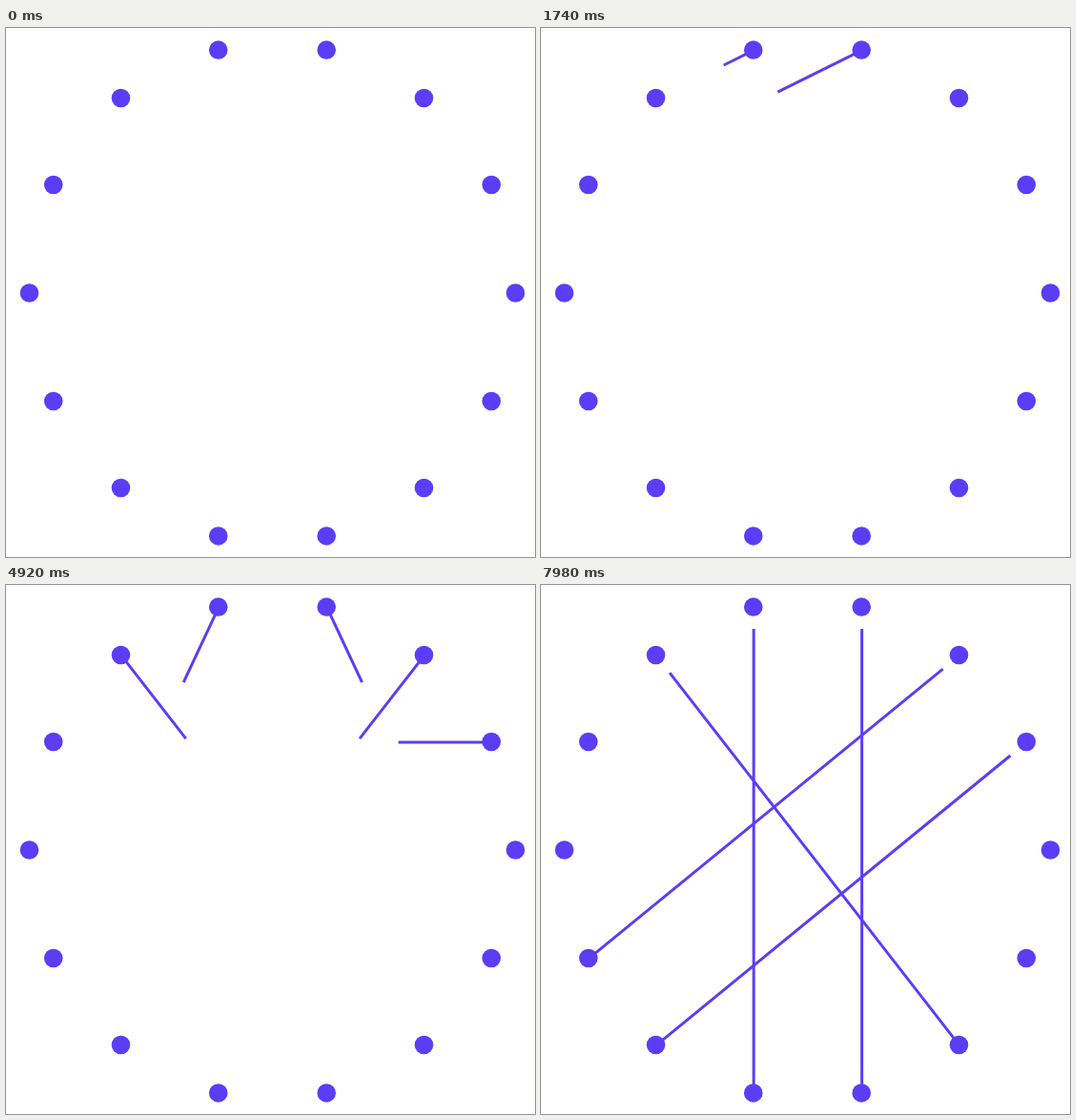
Animation of 555x555 px, one loop 8 s. Source, as an HTML page with a canvas:

```html
<!DOCTYPE html>
<html lang="en">
<head>
<meta charset="utf-8">
<title>Ring of dots</title>
<style>
  html, body { margin: 0; width: 100%; height: 100%; overflow: hidden; background: #fff; }
  canvas { display: block; }
</style>
</head>
<body>
<canvas id="stage" width="555" height="555"></canvas>
<script>
const ctx = document.getElementById('stage').getContext('2d');
const LOOP = 8000;
const HOLD = 1122; // time a finished pattern rests before the next change
const COLOR = '#5b3df5';

// Dots run clockwise from the rightmost one.
const dots = Array.from({ length: 14 }, (_, i) => {
  const a = i * Math.PI / 7;
  return [279.5 + 255 * Math.cos(a), 278 + 261.5 * Math.sin(a)];
});

// Links leave consecutive dots, counted from `first`, towards the dots in `ends`.
const patterns = [
  { first: 6, ends: [0, 1, 2, 3, 4, 5] },
  { first: 10, ends: [9, 8] },
  { first: 9, ends: [2, 6, 1, 5, 8], reverse: true },
  { first: 6, ends: [4, 5, 1, 2, 12, 13] },
  { first: 9, ends: [2, 4, 3, 6, 5] }
];

// A change wipes the old pattern in its first half and grows the new one in its second.
const starts = [-270, 1372, 3045, 4727, 6371, 7969];
const changes = starts.map((from, i) => ({ from, to: (starts[i + 1] ?? from + 1650) - HOLD }));

const clamp = p => Math.min(1, Math.max(0, p));
const mix = (a, b, p) => a.map((v, i) => v + (b[i] - v) * p);
const phase = (t, { from, to }) => (t - from) / (to - from);

function drawLink(a, b, tail, head) {
  ctx.beginPath();
  ctx.moveTo(...mix(a, b, tail));
  ctx.lineTo(...mix(a, b, head));
  ctx.stroke();
}

function render(t) {
  ctx.fillStyle = '#fff';
  ctx.fillRect(0, 0, 555, 555);
  ctx.fillStyle = ctx.strokeStyle = COLOR;
  ctx.lineWidth = 3;

  ctx.save();
  ctx.translate(0.4, 0.4);
  patterns.forEach(({ first, ends, reverse }, i) => {
    const head = clamp((phase(t, changes[i]) - 0.52) / 0.48);
    const tail = clamp(phase(t, changes[i + 1]) / 0.47);
    if (head <= tail) return;
    ends.forEach((end, k) => {
      const link = [dots[first + k], dots[end]];
      if (reverse) link.reverse();
      drawLink(...link, tail, head);
    });
  });
  ctx.restore();

  for (const [x, y] of dots) {
    ctx.beginPath();
    ctx.arc(x, y, 9.8, 0, 2 * Math.PI);
    ctx.fill();
  }
}

let start;
function frame(now) {
  start ??= now;
  render((now - start) % LOOP);
  requestAnimationFrame(frame);
}
render(0);
requestAnimationFrame(frame);
</script>
</body>
</html>
```
